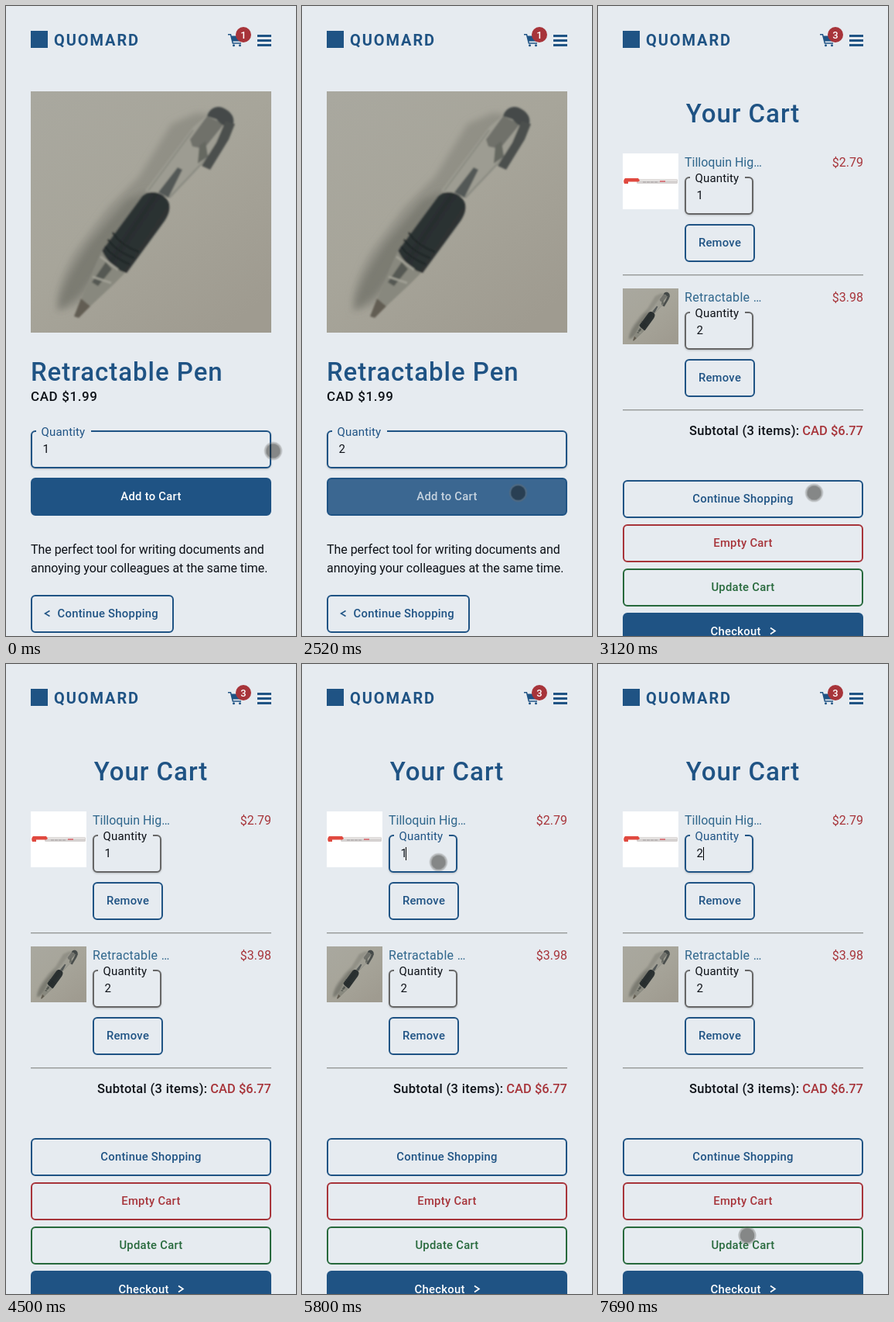
Animation of 375 by 812 pixels, one loop 7.99 s. Source, as an HTML page:

```html
<!DOCTYPE html>
<html lang="en">
<head>
<meta charset="utf-8">
<title>Pen shop cart</title>
<style>
  :root { --page: #e6ebf0; --blue: #1f5384; --red: #a7343a; --green: #27693c; --loop: 7990ms; }
  html, body { margin: 0; width: 100%; height: 100%; overflow: hidden; background: var(--page); }
  svg { display: block; width: 375px; height: 812px; }
  text { font: 400 16px Roboto, "Open Sans", sans-serif; fill: #0d1117; white-space: pre; }
  .brand { font-size: 20px; font-weight: 700; letter-spacing: 1.9px; fill: var(--blue); }
  .title { font-size: 33px; font-weight: 500; letter-spacing: .95px; fill: var(--blue); }
  .price { font-size: 17px; font-weight: 500; letter-spacing: .6px; }
  .copy { letter-spacing: -.04px; }
  .label { font-size: 15px; letter-spacing: .15px; }
  .value { font-size: 15px; }
  .action { font-size: 14.8px; font-weight: 500; letter-spacing: .28px; fill: var(--blue); }
  .mid { text-anchor: middle; }
  .end { text-anchor: end; }
  .name { fill: #2f668c; }
  .cost { fill: var(--red); }
  .sum { font-size: 16.5px; font-weight: 500; }
  .badge { font-size: 13px; font-weight: 500; fill: #fff; text-anchor: middle; }
  .box { fill: none; stroke: var(--blue); stroke-width: 2; }
  .field { fill: var(--page); stroke: #666; stroke-width: 2; filter: drop-shadow(0 1px 1px #0003); }
  .blue { stroke: var(--blue); }
  .fill { fill: var(--blue); }
  .light { fill: #fff; }
  .gap { fill: var(--page); }
  .rule { fill: #929493; }

  .shop, .cart, .before, .after, .caret, .focus, .focus-label
    { animation: var(--loop) step-end infinite; }
  .bar, .press, .press-text, .dot { animation: var(--loop) linear infinite; }
  .shop { animation-name: shop; }
  .cart { animation-name: cart; }
  .bar { animation-name: bar; }
  .press { animation-name: press; }
  .press-text { animation-name: press-text; }
  .dot { animation-name: dot; }
  .shop .before { animation-name: shop-before; }
  .shop .after { animation-name: shop-after; }
  .shop .caret { animation-name: shop-caret; }
  .cart .before { animation-name: cart-before; }
  .cart .after { animation-name: cart-after; }
  .cart .caret { animation-name: cart-caret; }
  .focus { animation-name: focus; }
  .focus-label { animation-name: focus-label; }

  @keyframes shop { 0% { opacity: 1 } 31.915%, 100% { opacity: 0 } }
  @keyframes cart { 0% { opacity: 0 } 31.915%, 100% { opacity: 1 } }
  @keyframes bar { 0%, 36.295% { opacity: 1 } 39%, 100% { opacity: 0 } }
  @keyframes press { 0%, 29.912% { fill: #1f5384 } 31.5%, 100% { fill: #3b6791 } }
  @keyframes press-text { 0%, 29.912% { fill: #fff } 31.5%, 100% { fill: #c6d3df } }

  @keyframes shop-before { 0% { opacity: 1 } 10.013%, 100% { opacity: 0 } }
  @keyframes shop-after { 0% { opacity: 0 } 13.767%, 100% { opacity: 1 } }
  @keyframes shop-caret {
    0% { opacity: 0; transform: translateX(54px) }
    2.128% { opacity: 1; transform: translateX(54px) }
    8.385% { opacity: 0; transform: translateX(54px) }
    10.013% { opacity: 1; transform: translateX(48px) }
    13.767% { opacity: 1; transform: translateX(56px) }
    20.025% { opacity: 0; transform: translateX(56px) }
    26.283% { opacity: 1; transform: translateX(56px) }
    29.912%, 100% { opacity: 0; transform: translateX(56px) }
  }
  @keyframes cart-before { 0% { opacity: 1 } 81.477%, 100% { opacity: 0 } }
  @keyframes cart-after { 0% { opacity: 0 } 82.728%, 100% { opacity: 1 } }
  @keyframes cart-caret {
    0% { opacity: 0; transform: translateX(134px) }
    70.839% { opacity: 1; transform: translateX(134px) }
    76.971% { opacity: 0; transform: translateX(134px) }
    81.477% { opacity: 1; transform: translateX(128px) }
    82.728% { opacity: 1; transform: translateX(136px) }
    88.986% { opacity: 0; transform: translateX(136px) }
    95.244%, 100% { opacity: 1; transform: translateX(136px) }
  }
  @keyframes focus { 0% { stroke: #666 } 70.839%, 100% { stroke: #1f5384 } }
  @keyframes focus-label { 0% { fill: #0d1117 } 70.839%, 100% { fill: #1f5384 } }

  /* Touch marker: fades in at a tap, fades out, then jumps while hidden */
  @keyframes dot {
    0%, .751% { opacity: 1; transform: translate(345.5px, 573.5px) }
    2.128% { opacity: 0; transform: translate(345.5px, 573.5px) }
    2.13%, 24.656% { opacity: 0; transform: translate(279.5px, 627.5px) }
    26.909%, 41.302% { opacity: 1; transform: translate(279.5px, 627.5px) }
    42.804% { opacity: 0; transform: translate(281px, 621px) }
    42.81%, 70.839% { opacity: 0; transform: translate(176.5px, 255.5px) }
    72.5%, 88.986% { opacity: 1; transform: translate(176.5px, 255.5px) }
    90.488% { opacity: 0; transform: translate(176.5px, 259px) }
    90.49%, 94.243% { opacity: 0; transform: translate(193px, 736.5px) }
    96.2%, 100% { opacity: 1; transform: translate(193px, 736.5px) }
  }
</style>
</head>
<body>
<svg viewBox="0 0 375 812" xmlns="http://www.w3.org/2000/svg">
  <defs>
    <linearGradient id="desk" x1="0" y1="0" x2=".8" y2="1">
      <stop offset="0" stop-color="#a9a89f"/>
      <stop offset=".5" stop-color="#a7a59a"/>
      <stop offset="1" stop-color="#9f9b90"/>
    </linearGradient>
    <linearGradient id="grip" x1="0" y1="0" x2="1" y2=".8">
      <stop offset="0" stop-color="#3a403f"/>
      <stop offset=".5" stop-color="#282e2f"/>
      <stop offset="1" stop-color="#353b3a"/>
    </linearGradient>
    <filter id="soft"><feGaussianBlur stdDeviation="4"/></filter>
    <filter id="lens"><feGaussianBlur stdDeviation=".9"/></filter>
    <symbol id="pen" viewBox="0 0 311 311">
      <path d="M0 0H311V311H0Z" fill="url(#desk)"/>
      <path d="M34 284C30 268 38 238 58 206L100 150 140 110 182 42 214 28 236 30 190 90 110 220 60 276Z" fill="#919086" filter="url(#soft)"/>
      <path d="M38 280C36 262 52 230 78 194L124 140 152 128 100 216 62 264Z" fill="#7c7b72" filter="url(#soft)"/>
      <g filter="url(#lens)">
        <path d="M148 128L210 46 236 24 260 38 250 64 180 139Z" fill="#9d9c92"/>
        <path d="M152 128L210 50M179 137L240 73" stroke="#898a81" stroke-width="2" fill="none"/>
        <path d="M165 130L190 98 196 101 178 137Z" fill="#535857"/>
        <path d="M206 62L228 32 250 42 224 74 209 71Z" fill="#70716b"/>
        <path d="M228 32C231 22 240 18 248 21 258 25 264 33 262 41L258 48 246 42 240 36Z" fill="#444948"/>
        <path d="M252 38L264 42 256 62 232 101 221 96 240 66Z" fill="#4b4f4d"/>
        <path d="M218 70L226 64 229 84 216 93Z" fill="#656861"/>
        <path d="M143 137C152 125 174 129 179 145 181 156 175 165 168 174L124 234C110 231 96 222 92 206Z" fill="url(#grip)"/>
        <path d="M106 182Q116 198 140 207M100 191Q110 206 134 215M96 200Q106 214 128 223" stroke="#1f2526" stroke-width="2" fill="none"/>
        <path d="M92 205Q102 226 122 234L108 248 77 277 65 268 80 232Z" fill="#88887e"/>
        <path d="M97 220L105 229 87 251 79 246Z" fill="#555852"/>
        <path d="M90 213L113 230M80 239L104 247" stroke="#a3a297" stroke-width="2.5" fill="none"/>
        <path d="M65 267L77 277 62 292 56 290Z" fill="#625d52"/>
      </g>
    </symbol>
  </defs>

  <rect class="gap" width="375" height="812"/>

  <g id="header">
    <rect class="fill" x="32" y="32" width="22" height="22"/>
    <text class="brand" x="62" y="51">QUOMARD</text>
    <path class="blue" d="M287 36.800h3.500l2.800 11.200h10.700" fill="none" stroke-width="1.5"/>
    <path class="fill" d="M291 38.500h15l-2 7h-11.300z"/>
    <circle class="fill" cx="294.500" cy="50.700" r="1.500"/>
    <circle class="fill" cx="302.500" cy="50.700" r="1.500"/>
    <circle cx="307" cy="37" r="10" fill="#a7343a"/>
    <path class="fill" d="M325 37h18v3h-18zm0 6h18v3h-18zm0 6h18v3h-18z"/>
  </g>

  <g class="shop">
    <text class="badge" x="307" y="41.5">1</text>
    <use href="#pen" x="32" y="110" width="311" height="311"/>
    <text class="title" x="32" y="483">Retractable Pen</text>
    <text class="price" x="32" y="509">CAD $1.99</text>
    <rect class="field blue" x="33" y="548" width="309" height="47" rx="5"/>
    <rect class="gap" x="39" y="545" width="71" height="6"/>
    <text class="label" x="45.5" y="554" style="fill:var(--blue)">Quantity</text>
    <text class="value before" x="47.5" y="576">1</text>
    <text class="value after" x="47.5" y="576">2</text>
    <rect class="caret" y="563" width="1" height="17"/>
    <rect class="box press" x="33" y="609" width="309" height="47" rx="5"/>
    <text class="action mid press-text" x="187.5" y="637">Add to Cart</text>
    <text class="copy" x="32" y="706">The perfect tool for writing documents and</text>
    <text class="copy" x="32" y="730">annoying your colleagues at the same time.</text>
    <rect class="box" x="33" y="760" width="183" height="47" rx="5"/>
    <path class="blue" d="M56.5 779.5l-6 3.5 6 3.5" fill="none" stroke-width="1.5"/>
    <text class="action" x="66.5" y="788">Continue Shopping</text>
  </g>

  <g class="cart">
    <text class="badge" x="307" y="41.5">3</text>
    <text class="title mid" x="187.5" y="150">Your Cart</text>

    <rect class="light" x="32" y="190" width="72" height="72"/>
    <rect x="50" y="223" width="53" height="6" rx="1.5" fill="#d5d1d0"/>
    <path d="M53 224.5h49" stroke="#ece9e8" stroke-width="1.5"/>
    <path d="M58 227h20" stroke="#a5a1a2" stroke-dasharray="4 1"/>
    <path d="M80 226h7" stroke="#d77b80" stroke-width="2"/>
    <path d="M35 222h17l2 3-2 1.5H39v2.500h-5q-2-4 1-7z" fill="#e0493f"/>
    <text class="name" x="112" y="207">Tilloquin Hig…</text>
    <text class="cost end" x="343" y="207">$2.79</text>
    <rect class="field focus" x="113" y="221" width="87" height="47" rx="5"/>
    <rect class="gap" x="119" y="218" width="71" height="6"/>
    <text class="label focus-label" x="125.500" y="227">Quantity</text>
    <text class="value before" x="127.500" y="249">1</text>
    <text class="value after" x="127.500" y="249">2</text>
    <rect class="caret" y="236" width="1" height="17"/>
    <rect class="box" x="113" y="282" width="89" height="47" rx="5"/>
    <text class="action mid" x="157.5" y="310">Remove</text>
    <rect class="rule" x="32" y="346" width="311" height="1.300"/>

    <use href="#pen" x="32" y="364" width="72" height="72"/>
    <text class="name" x="112" y="381" letter-spacing=".3">Retractable …</text>
    <text class="cost end" x="343" y="381">$3.98</text>
    <rect class="field" x="113" y="395" width="87" height="47" rx="5"/>
    <rect class="gap" x="119" y="392" width="71" height="6"/>
    <text class="label" x="125.500" y="401">Quantity</text>
    <text class="value" x="127.500" y="423">2</text>
    <rect class="box" x="113" y="456" width="89" height="47" rx="5"/>
    <text class="action mid" x="157.5" y="484">Remove</text>
    <rect class="rule" x="32" y="520" width="311" height="1.300"/>

    <text class="sum" x="118" y="553" letter-spacing=".3">Subtotal (3 items):</text>
    <text class="sum cost end" x="343" y="553">CAD $6.77</text>

    <rect class="box" x="33" y="612" width="309" height="47" rx="5"/>
    <text class="action mid" x="187.5" y="640">Continue Shopping</text>
    <rect class="box" x="33" y="669" width="309" height="47" rx="5" style="stroke:var(--red)"/>
    <text class="action mid" x="187.5" y="697" style="fill:var(--red)">Empty Cart</text>
    <rect class="box" x="33" y="726" width="309" height="47" rx="5" style="stroke:var(--green)"/>
    <text class="action mid" x="187.5" y="754" style="fill:var(--green)">Update Cart</text>
    <rect class="fill" x="32" y="782" width="311" height="49" rx="6"/>
    <text class="action" x="145.500" y="811" style="fill:#fff">Checkout</text>
    <path d="M223 801.500l6 4-6 4" fill="none" stroke="#fff" stroke-width="1.6"/>
    <rect class="bar" x="368" y="4" width="3" height="562" rx="1.5" fill="#8c8f92"/>
  </g>

  <g class="dot">
    <circle r="9.500" fill="#14120a" fill-opacity=".46"/>
    <circle r="10.500" fill="none" stroke="#6e6e6c" stroke-opacity=".4" stroke-width="2"/>
  </g>
</svg>
</body>
</html>
```
